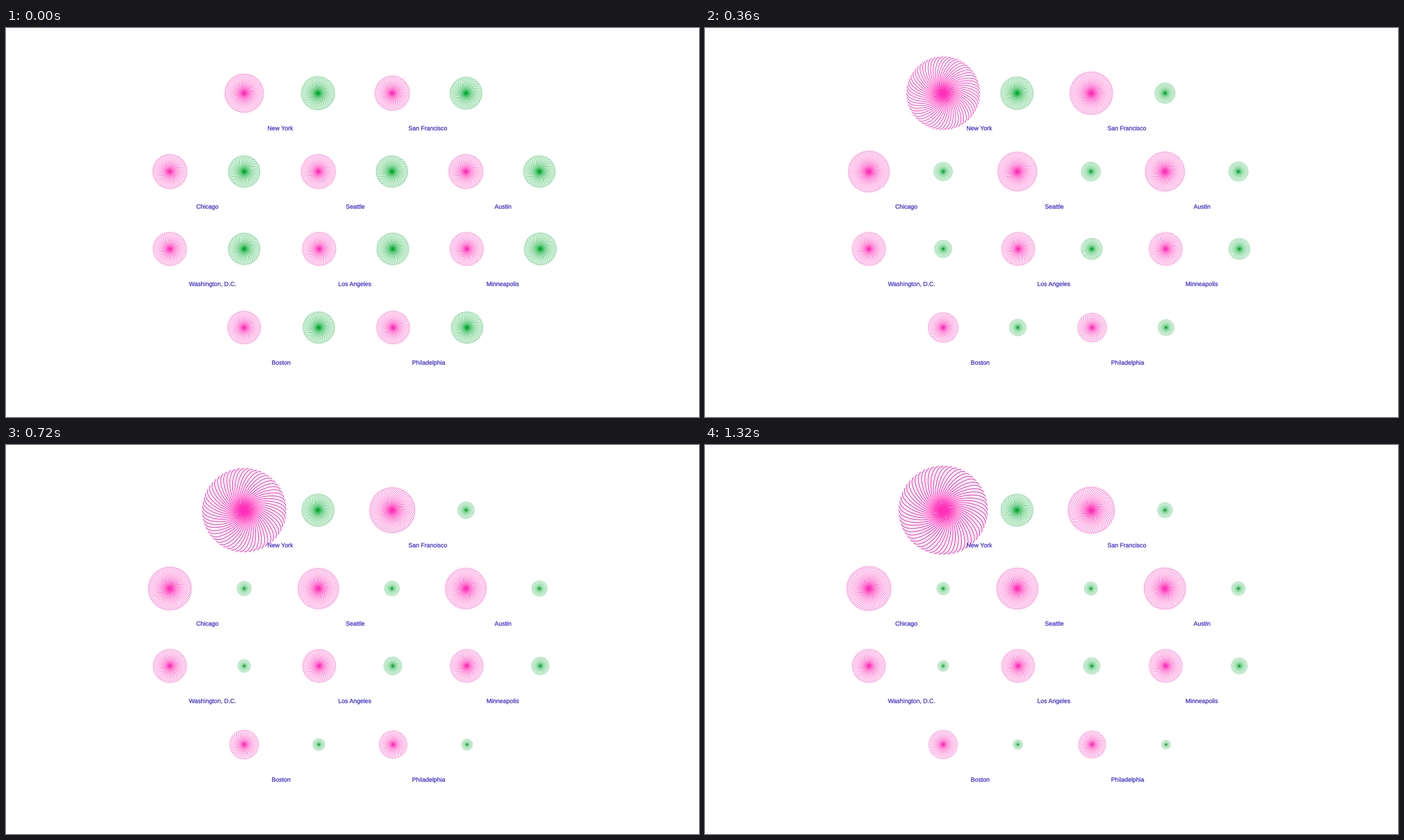
These frames come from a looping animation (998 by 561 pixels, 1.41 s). A matplotlib script:

```python
import numpy as np
import matplotlib.pyplot as plt
from matplotlib.animation import FuncAnimation
from matplotlib.collections import LineCollection
from matplotlib.patches import PathPatch
from matplotlib.textpath import TextPath
from matplotlib.transforms import Affine2D

W, H, DPI = 998, 561, 64
PX = 72 / DPI  # one pixel in points
STEP, FRAMES = 30, 47
PINK, GREEN, BLUE = "#ff2fb9", "#00ab2e", "#3a2bd0"
PETALS = 60
STROKE = 1.1 / 64  # line width relative to the radius

# name, label centre, pink x, pink radii, green x, green radii
ROWS = [
    (94, [
        ("New York", 395.3, 343, (28, 63.9), 449.3, (24.3, 23.4)),
        ("San Francisco", 607.5, 556.3, (25.2, 33.7), 662.5, (23.3, 11)),
    ]),
    (207, [
        ("Chicago", 290, 236, (25, 32), 343, (23, 9.2)),
        ("Seattle", 503, 449.8, (25, 30), 555.8, (23, 9.7)),
        ("Austin", 715.5, 662.3, (25, 30.2), 768.2, (23, 10)),
    ]),
    (318.6, [
        ("Washington, D.C.", 297.2, 236, (24.3, 24.2), 343, (23, 8)),
        ("Los Angeles", 502.5, 451, (24.3, 24), 557, (23.2, 12)),
        ("Minneapolis", 715.5, 663.5, (24.3, 23.9), 769.5, (23.3, 11.7)),
    ]),
    (432, [
        ("Boston", 396.3, 343, (24, 20.8), 450.5, (23, 7.2)),
        ("Philadelphia", 609, 557.5, (24, 19.8), 664, (23, 6.5)),
    ]),
]


def flower():
    """Half ellipses from the centre to the rim, turned around the centre."""
    t = np.linspace(0, np.pi, 26)
    petal = 0.5 * (1 - np.cos(t)) - 0.22j * np.sin(t)
    turns = np.exp(2j * np.pi * np.arange(PETALS) / PETALS)
    z = turns[:, None] * petal
    return np.stack([z.real, z.imag], axis=-1)


def ease(ms):
    """Decaying approach to the final size."""
    times = [0, 120, 360, 600, 840, 1080, 1320]
    left = [1, 0.736, 0.319, 0.153, 0.07, 0.028, 0.008]
    return 1 - np.exp(np.interp(ms, times, np.log(left)))


fig = plt.figure(figsize=(W / DPI, H / DPI), dpi=DPI, facecolor="white")
ax = fig.add_axes([0, 0, 1, 1])
ax.set_xlim(0, W)
ax.set_ylim(H, 0)
ax.axis("off")

UNIT = flower()
flowers = []


def add_flower(x, y, radii, color):
    lines = LineCollection([], colors=color, capstyle="butt")
    ax.add_collection(lines, autolim=False)
    flowers.append((lines, np.array([x, y]), radii))


def add_label(text, x, y):
    path = TextPath((0, 0), text, size=8.75, prop={"family": "Liberation Sans"})
    box = path.get_extents()
    place = Affine2D().translate(-(box.x0 + box.x1) / 2, 0).scale(1, -1).translate(x, y)
    ax.add_patch(PathPatch(place.transform_path(path), facecolor=BLUE,
                           edgecolor=BLUE, lw=0.22 * PX, zorder=5))


for y, cities in ROWS:
    for name, label_x, pink_x, pink_r, green_x, green_r in cities:
        add_flower(pink_x, y, pink_r, PINK)
        add_flower(green_x, y, green_r, GREEN)
        add_label(name, label_x, y + 53.5)


def draw(i):
    p = ease(i * STEP)
    for lines, centre, (start, end) in flowers:
        r = start + (end - start) * p
        lines.set_segments(centre + r * UNIT)
        lines.set_linewidth(r * STROKE * PX)
    return [f[0] for f in flowers]


anim = FuncAnimation(fig, draw, frames=FRAMES, interval=STEP,
                     init_func=lambda: draw(0), repeat=True, repeat_delay=0)
plt.show()
```
